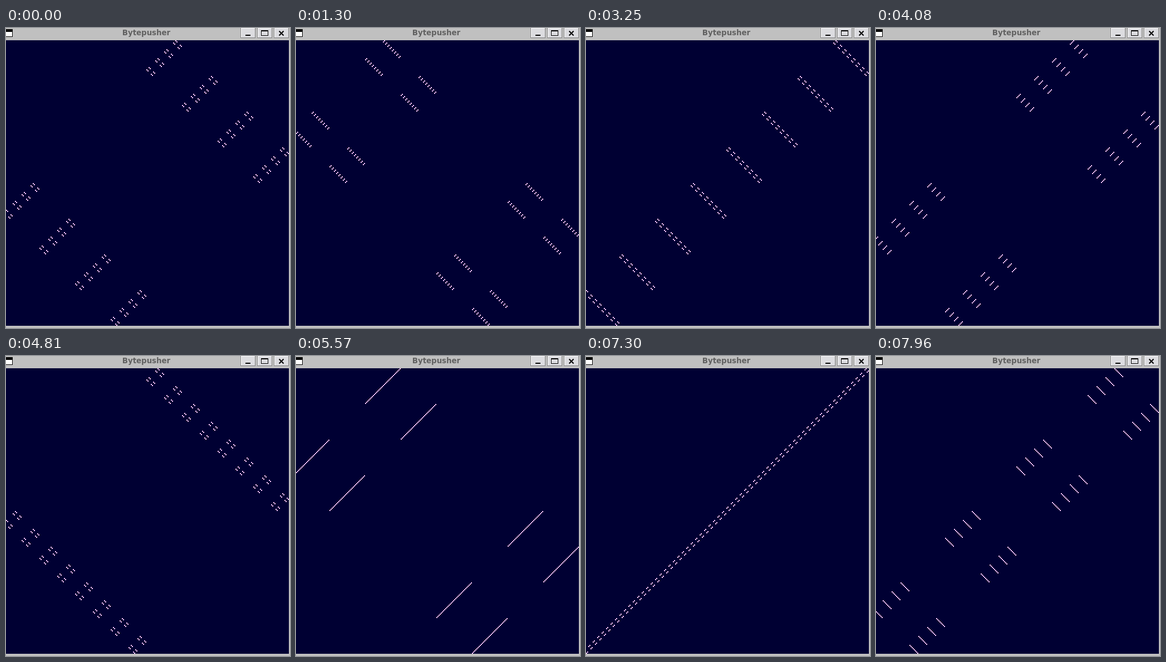
Animation, 510 px wide and 538 px high, one loop 7990 ms. Source, as an HTML page with a canvas:

```html
<!DOCTYPE html>
<html lang="en">
<head>
<meta charset="utf-8">
<title>Bytepusher</title>
<style>
  html, body { margin: 0; width: 100%; height: 100%; overflow: hidden; background: #c0c0c0; }
  svg, canvas { position: absolute; left: 0; top: 0; display: block; }
  canvas { top: 22px; }
  text { font: bold 13.33px "DejaVu Sans", sans-serif; fill: #606060; }
</style>
</head>
<body>
<svg width="510" height="538" shape-rendering="crispEdges">
  <defs>
    <g id="button">
      <rect width="27" height="18" fill="#808080"/>
      <rect x="1" width="25" height="17" fill="#fff"/>
      <rect x="2" y="1" width="24" height="16" fill="#dcdce0"/>
    </g>
  </defs>
  <path d="M0 2h12v14H0z"/>
  <path d="M0 7h11v8H0z" fill="#fff"/>
  <text x="252" y="13" text-anchor="middle">Bytepusher</text>
  <use href="#button" x="421"/>
  <use href="#button" x="451"/>
  <use href="#button" x="481"/>
  <path d="M430 12h9v2h-9z"/>
  <path d="M458 4h13v10h-13zM459 6v7h11V6z" fill-rule="evenodd"/>
  <path d="M490.5 5.5l8 8m0-8l-8 8" stroke="#000" stroke-width="2" shape-rendering="auto"/>
</svg>
<canvas width="508" height="512"></canvas>
<script>
const LOOP = 7990, SIZE = 256, CELL = 2, CROP = 4;
const START = 154, RATE = 0.0566;
// [step number, ms] points between which the screen refreshes evenly
const PACE = [[0, 0], [26, 840], [51, 1660], [77, 2460], [103, 3280], [128, 4080],
  [154, 4900], [179, 5700], [205, 6520], [230, 7330], [251, LOOP]];

const refreshes = [];
for (let i = 1; i < PACE.length; i++) {
  const [n0, t0] = PACE[i - 1], [n1, t1] = PACE[i];
  for (let n = n0; n < n1; n++) {
    refreshes.push(Math.round((t0 + (t1 - t0) * (n - n0) / (n1 - n0)) / 10) * 10);
  }
}

const ctx = document.querySelector('canvas').getContext('2d');

// Munching squares: light every cell where x XOR y equals the counter.
function draw(counter) {
  ctx.fillStyle = '#000033';
  ctx.fillRect(0, 0, 508, 512);
  ctx.fillStyle = '#ffccff';
  for (let y = 0; y < SIZE; y++) {
    ctx.fillRect((y ^ counter) * CELL - CROP, y * CELL, CELL, CELL);
  }
}

const origin = performance.now();
function tick() {
  const time = (performance.now() - origin) % LOOP;
  const shown = refreshes.findLast(t => t <= time);
  draw((START - Math.floor(shown * RATE + 0.35)) & 255);
  requestAnimationFrame(tick);
}
tick();
</script>
</body>
</html>
```
